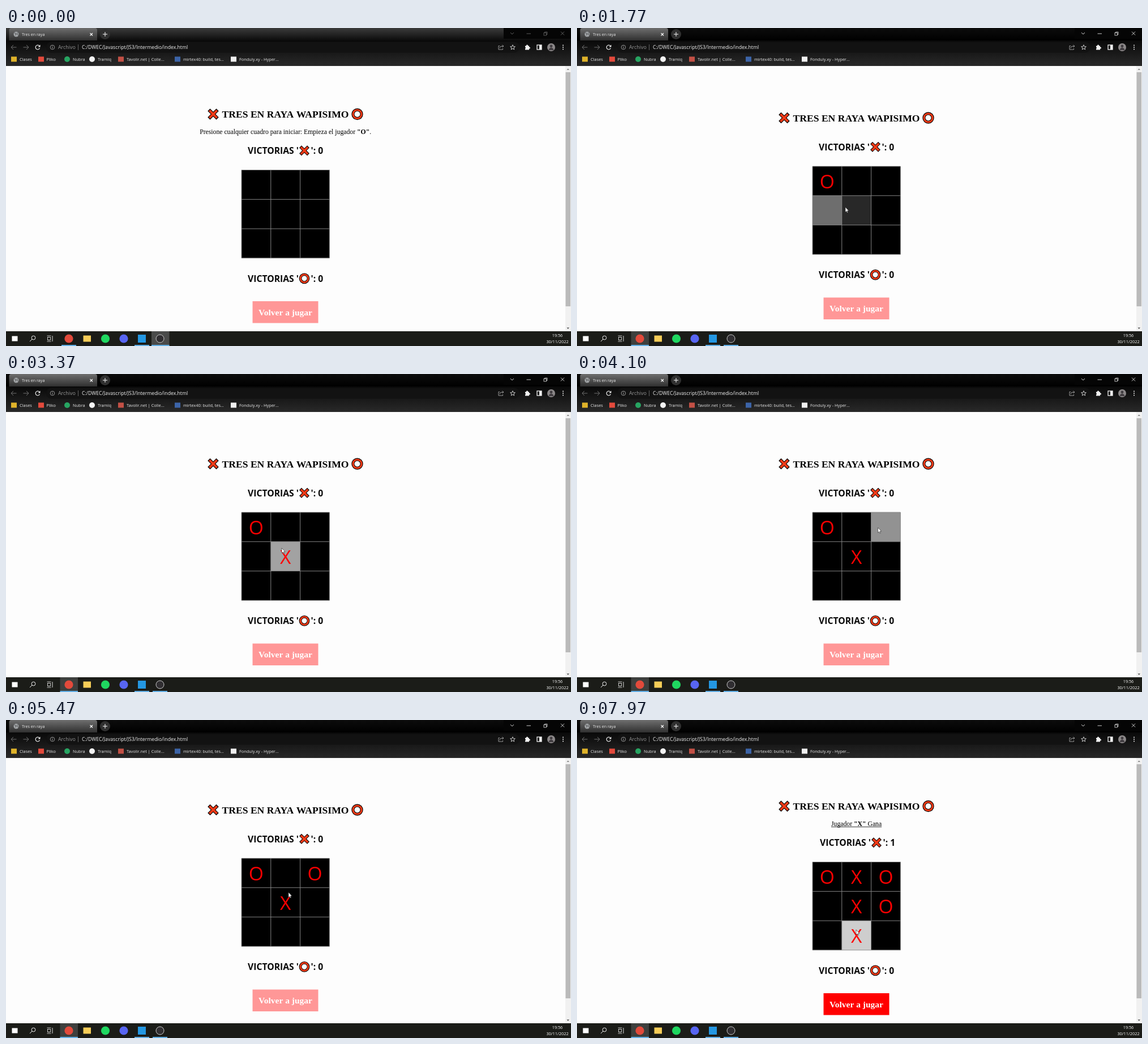
Animation of 998 by 561 pixels, one loop 8000 ms. Source, as an HTML page with a canvas:

```html
<!DOCTYPE html>
<html lang="es">
<head>
<meta charset="utf-8">
<title>Tres en raya</title>
<style>
html, body { margin: 0; width: 100%; height: 100%; overflow: hidden; background: #fdfdfd; }
canvas { display: block; width: 100vw; height: 100vh; }
</style>
</head>
<body>
<canvas id="stage" width="998" height="561"></canvas>
<script>
const ctx = document.getElementById('stage').getContext('2d');
const LOOP = 8000, FADE = 500;
const START = 1150, WIN = 7950;
const SANS = '"Open Sans", "Noto Sans", sans-serif';
const SERIF = '"Liberation Serif", "Times New Roman", serif';
const RED = '#f03a17';

// Board: cell index, mark, time of the click
const moves = [[0, 'O', START], [4, 'X', 3285], [2, 'O', 4760], [1, 'X', 6270], [5, 'O', 7060], [7, 'X', WIN]];
// Lit cells: cell index, time in, time out
const hovers = [[0, 850, START], [3, 1470, 1695], [4, 1695, 3285], [1, 3802, 3898],
  [2, 3898, 4760], [1, 5565, 6270], [5, 6390, 7060], [7, 7275, WIN]];
// Pointer: time, x, y
const path = [[250, -8, 300], [900, 438, 272], [1250, 441, 276], [1560, 455, 318], [1770, 474, 316],
  [2100, 492, 322], [3150, 489, 309], [3370, 487, 307], [3700, 490, 305], [4000, 530, 272],
  [4300, 536, 268], [4600, 535, 289], [4760, 536, 285], [5200, 502, 303], [5470, 499, 304],
  [5750, 494, 272], [6270, 493, 270], [6510, 545, 325], [6830, 544, 332], [7100, 544, 330],
  [7450, 496, 366], [7970, 493, 370]];

const clamp = v => Math.max(0, Math.min(1, v));

// CSS "ease": cubic-bezier(.25, .1, .25, 1)
function ease(x) {
  x = clamp(x);
  let lo = 0, hi = 1;
  const bez = (a, b, s) => 3 * a * s * (1 - s) ** 2 + 3 * b * s * s * (1 - s) + s ** 3;
  for (let i = 0; i < 20; i++) {
    const mid = (lo + hi) / 2;
    if (bez(.25, .25, mid) < x) lo = mid; else hi = mid;
  }
  return bez(.1, 1, lo);
}

function glow(cell, t) {
  let v = 0;
  for (const [c, start, end] of hovers) {
    if (c !== cell || t < start) continue;
    const peak = ease((Math.min(t, end) - start) / FADE);
    const now = t < end ? peak : peak * (1 - ease((t - end) / (FADE * peak)));
    v = Math.max(v, now);
  }
  return v;
}

function rect(x, y, w, h, color) {
  ctx.fillStyle = color;
  ctx.fillRect(x, y, w, h);
}

function disc(x, y, r, color) {
  ctx.fillStyle = color;
  ctx.beginPath();
  ctx.arc(x, y, r, 0, 7);
  ctx.fill();
}

function line(points, color, width = 1) {
  ctx.strokeStyle = color;
  ctx.lineWidth = width;
  ctx.beginPath();
  points.forEach(([x, y], i) => i ? ctx.lineTo(x, y) : ctx.moveTo(x, y));
  ctx.stroke();
}

function ring(x, y, r, color, width = 1) {
  ctx.strokeStyle = color;
  ctx.lineWidth = width;
  ctx.beginPath();
  ctx.arc(x, y, r, 0, 7);
  ctx.stroke();
}

function box(x, y, w, h, color, width = 1) {
  ctx.strokeStyle = color;
  ctx.lineWidth = width;
  ctx.strokeRect(x, y, w, h);
}

function poly(points, color) {
  ctx.fillStyle = color;
  ctx.beginPath();
  points.forEach(([x, y]) => ctx.lineTo(x, y));
  ctx.closePath();
  ctx.fill();
}

function shade(y0, y1, from, to) {
  const g = ctx.createLinearGradient(0, y0, 0, y1);
  g.addColorStop(0, from);
  g.addColorStop(1, to);
  return g;
}

function text(s, x, y, font, color = '#000', align = 'left') {
  ctx.font = font;
  ctx.fillStyle = color;
  ctx.textAlign = align;
  ctx.fillText(s, x, y);
  return ctx.measureText(s).width;
}

function label(s, x, y, size, color = '#e8e8e8', align) {
  text(s, x, y + size * .35, `${size}px ${SANS}`, color, align);
}

function cross(x, y, k) {
  const bars = (d, color, w) => {
    line([[x - d, y - d], [x + d, y + d]], color, w);
    line([[x - d, y + d], [x + d, y - d]], color, w);
  };
  bars(7.6 * k, '#000', 6 * k);
  bars(6.7 * k, RED, 3.9 * k);
}

function hoop(x, y, k) {
  disc(x, y, 10.2 * k, '#000');
  disc(x, y, 9.1 * k, RED);
  disc(x, y, 6 * k, '#000');
  disc(x, y, 5 * k, '#fdfdfd');
}

function windowButtons(active) {
  const c = active ? '#e6e6e6' : '#686868';
  rect(879, 0, 119, 19, '#050505');
  line([[891, 8], [894, 11], [897, 8]], c, .9);
  line([[919.5, 10], [927, 10]], c, .9);
  box(950, 8.5, 4.5, 4.5, c, .8);
  line([[951.5, 8], [951.5, 7], [956, 7], [956, 11.5], [955, 11.5]], c, .8);
  line([[980, 6.5], [986, 12.5]], c, .9);
  line([[980, 12.5], [986, 6.5]], c, .9);
}

function tabStrip(active) {
  rect(0, 0, 998, 24, active ? shade(0, 22, '#0c0c0c', '#000') : shade(0, 22, '#3b3b3b', '#0c0c0c'));
  ctx.fillStyle = shade(0, 22, '#6e6e6e', '#303030');
  ctx.beginPath();
  ctx.roundRect(5.5, 0, 155.5, 23, [4, 4, 0, 0]);
  ctx.fill();
  disc(18, 11, 4.5, '#a3a6a8');
  line([[15, 8.5], [18, 10.5], [16.5, 13]], '#5b5d5e', 1.3);
  line([[20, 8], [20, 11], [21.5, 13]], '#5b5d5e', 1.1);
  label('Tres en raya', 28, 11, 7.2);
  line([[148.5, 9], [153, 13.5]], '#fff', 1.1);
  line([[148.5, 13.5], [153, 9]], '#fff', 1.1);
  disc(175, 11, 9, '#303030');
  line([[171, 11], [179, 11]], '#eee', 1.1);
  line([[175, 7], [175, 15]], '#eee', 1.1);
  windowButtons(active);
}

function arrow(x, y, dir, color) {
  line([[x - 4.5, y], [x + 4.5, y]], color);
  line([[x + dir, y - 4], [x + dir * 5, y], [x + dir, y + 4]], color);
}

function toolbar() {
  rect(0, 22, 998, 45, shade(22, 67, '#090909', '#292929'));
  ctx.fillStyle = '#121212';
  ctx.beginPath();
  ctx.roundRect(71, 24.5, 836, 19, 9.5);
  ctx.fill();
  arrow(14, 34, -1, '#707070');
  arrow(35, 34, 1, '#707070');
  ctx.strokeStyle = '#eee';
  ctx.lineWidth = 1.2;
  ctx.beginPath();
  ctx.arc(56, 34, 3.8, .4, 5.5);
  ctx.stroke();
  poly([[60.5, 29.5], [60.5, 33.5], [56.5, 33.5]], '#eee');
  ring(82, 34, 3.8, '#a0a0a0', .9);
  rect(81.5, 33.2, 1, 3, '#a0a0a0');
  rect(81.5, 31.5, 1, 1, '#a0a0a0');
  label('Archivo', 92, 34, 8.9, '#969696');
  rect(127, 29, .8, 10, '#777');
  label('C:/DWEC/Javascript/JS3/Intermedio/index.html', 134, 34, 8.7, '#f2f2f2');

  line([[872, 31.5], [870, 31.5], [870, 38], [877.5, 38], [877.5, 36]], '#bbb', .8);
  line([[872, 35.5], [873.5, 32.5], [878.5, 32]], '#bbb', .8);
  line([[876.5, 30], [879, 32], [876.5, 34]], '#bbb', .8);
  ctx.beginPath();
  for (let i = 0; i < 10; i++) {
    const r = i % 2 ? 2 : 4.6, a = i * Math.PI / 5 - Math.PI / 2;
    ctx.lineTo(895 + r * Math.cos(a), 34.3 + r * Math.sin(a));
  }
  ctx.closePath();
  ctx.strokeStyle = '#ddd';
  ctx.lineWidth = .9;
  ctx.stroke();
  rect(917, 31.5, 7, 7, '#f2f2f2');
  disc(920.5, 31, 1.6, '#f2f2f2');
  disc(924.4, 35, 1.6, '#f2f2f2');
  disc(917, 35, 1.1, '#121212');
  box(938, 30, 8, 8, '#f2f2f2', 1.3);
  rect(942, 30, 4, 8, '#f2f2f2');
  disc(963, 34, 7, '#8b8788');
  disc(963, 32, 2.4, '#403c40');
  ctx.beginPath();
  ctx.arc(963, 39, 4.2, Math.PI, 0);
  ctx.fill();
  for (const y of [30.5, 34, 37.5]) disc(984, y, 1, '#eee');
}

function bookmarks() {
  const items = [
    [9, 24, 'Clases', '#dfb32a', 0], [57, 71.5, 'Pliko', '#e34a3c', 0],
    [103, 118, 'Nubra', '#27a562', 1], [147, 162, 'Tramiq', '#f4f4f4', 1],
    [198, 213, 'Tavolir.net | Colle...', '#c25045', 0],
    [298, 313, 'mirtex40: build, tes...', '#3c64a8', 0],
    [397, 412, 'Fonduly.xy - Hyper...', '#f1f1f1', 0]
  ];
  for (const [x, tx, name, color, round] of items) {
    if (round) disc(x + 5, 55, 5, color);
    else rect(x, 50.5, 10, 9, color);
    label(name, tx, 55, 7.4);
  }
}

function scrollbar() {
  rect(988, 67, 10, 468, '#f1f1f1');
  rect(988.5, 78, 8.5, 413, '#bababa');
  poly([[990.5, 74], [995, 74], [992.7, 71.5]], '#858585');
  poly([[990.5, 528.5], [995, 528.5], [992.7, 531]], '#505050');
}

function taskbar(active) {
  rect(0, 535, 998, 26, '#1b1c18');
  if (active) rect(95.5, 535, 31.5, 26, '#3e403e');
  else rect(257, 535, 31.5, 26, '#4a4b4a');
  const mark = '#62afe6';
  rect(active ? 95.5 : 98, 559, active ? 31.5 : 26, 2, mark);
  rect(227, 559, 26, 2, mark);
  rect(active ? 259 : 257, 559, active ? 26 : 31.5, 2, mark);
  rect(10.5, 543.5, 10, 9, '#fff');
  ring(48.5, 546.5, 3.4, '#eee', 1);
  line([[46, 549], [42, 553]], '#eee', 1);
  box(73.5, 545.5, 5, 5, '#ddd', .9);
  line([[72.5, 543], [79.5, 543]], '#ddd', .9);
  line([[72.5, 553], [79.5, 553]], '#ddd', .9);
  line([[82, 543], [82, 553]], '#ddd', 1);
  disc(111, 548, 7.6, '#e24a3b');
  rect(136.5, 542.5, 13.5, 11, '#f6cd58');
  disc(175.5, 548, 7.6, '#1fd760');
  disc(208, 548, 7.6, '#5865f2');
  rect(233, 541, 14, 14, '#2497e2');
  disc(272, 548, 7.2, '#302e31');
  ring(272, 548, 7, '#c9c9c9', 1);
  label('19:56', 974, 542, 7.2, '#fff', 'center');
  label('30/11/2022', 974, 553.5, 7.4, '#fff', 'center');
}

function score(x, y, emoji, n) {
  const font = `bold 15.7px ${SANS}`;
  text("VICTORIAS '", x, y + 5.8, font, '#0a0a0a');
  emoji(x + 100, y, .92);
  text(`': ${n}`, x + 111.5, y + 5.8, font, '#0a0a0a');
}

function message(parts, y, underline) {
  const fonts = parts.map((_, i) => `${i % 2 ? 'bold ' : ''}11.72px ${SERIF}`);
  const width = parts.reduce((sum, s, i) => {
    ctx.font = fonts[i];
    return sum + ctx.measureText(s).width;
  }, 0);
  const left = 493.6 - width / 2;
  let x = left;
  parts.forEach((s, i) => { x += text(s, x, y, fonts[i]); });
  if (underline) rect(left, y + 1.3, width, .8, '#000');
}

function board(t, top) {
  const left = 416, size = 51.8;
  for (let i = 0; i < 9; i++) {
    const x = left + i % 3 * size, y = top + Math.floor(i / 3) * size;
    const g = Math.round(211 * glow(i, t));
    rect(x, y, size, size, `rgb(${g},${g},${g})`);
  }
  for (let i = 0; i < 4; i++) {
    const d = i * size;
    line([[left + d, top], [left + d, top + 3 * size]], '#858585', .9);
    line([[left, top + d], [left + 3 * size, top + d]], '#858585', .9);
  }
  for (const [cell, mark, when] of moves) {
    if (t < when) continue;
    const x = left + (cell % 3 + .5) * size, y = top + Math.floor(cell / 3) * size;
    text(mark, x, y + 38.8, `33.6px ${SANS}`, '#f00', 'center');
  }
}

function page(t) {
  const won = t >= WIN, started = t >= START;
  const shift = started && !won ? 6.5 : 0;
  rect(0, 67, 998, 468, '#fdfdfd');
  cross(366, 152 + shift, 1);
  text('TRES EN RAYA WAPISIMO', 493.5, 158 + shift, `bold 17.58px ${SERIF}`, '#000', 'center');
  hoop(620.5, 152 + shift, 1);
  if (!started) message(['Presione cualquier cuadro para iniciar: Empieza el jugador ', '"O"', '.'], 187);
  if (won) message(['Jugador ', '"X"', ' Gana'], 187, true);
  score(won ? 429 : 427, 216.3 - shift, cross, won ? 1 : 0);
  board(t, 250.5 - shift);
  score(427, 441.8 - shift, hoop, 0);
  rect(435.5, 482 - shift, 116, 38.5, won ? '#f00' : '#ff9797');
  text('Volver a jugar', 493.5, 506.5 - shift, `bold 15.5px ${SERIF}`, '#fff', 'center');
}

function pointer(t) {
  if (t < path[0][0]) return;
  let i = path.findIndex(p => p[0] > t);
  if (i < 0) i = path.length - 1;
  const [t0, x0, y0] = path[i - 1], [t1, x1, y1] = path[i];
  const u = clamp((t - t0) / (t1 - t0)), s = u * u * (3 - 2 * u);
  const x = x0 + (x1 - x0) * s, y = y0 + (y1 - y0) * s;
  const shape = [[0, 0], [0, 9], [2, 7.2], [3.3, 10], [4.6, 9.4], [3.4, 6.7], [6, 6.5]].map(([a, b]) => [x + a, y + b]);
  poly(shape, '#fff');
  line([...shape, shape[0]], '#222', .6);
}

function draw(now) {
  const t = now % LOOP, active = t >= START;
  page(t);
  scrollbar();
  tabStrip(active);
  toolbar();
  bookmarks();
  taskbar(active);
  pointer(t);
}

const began = performance.now();
function tick() {
  draw(performance.now() - began);
  requestAnimationFrame(tick);
}
tick();
</script>
</body>
</html>
```
